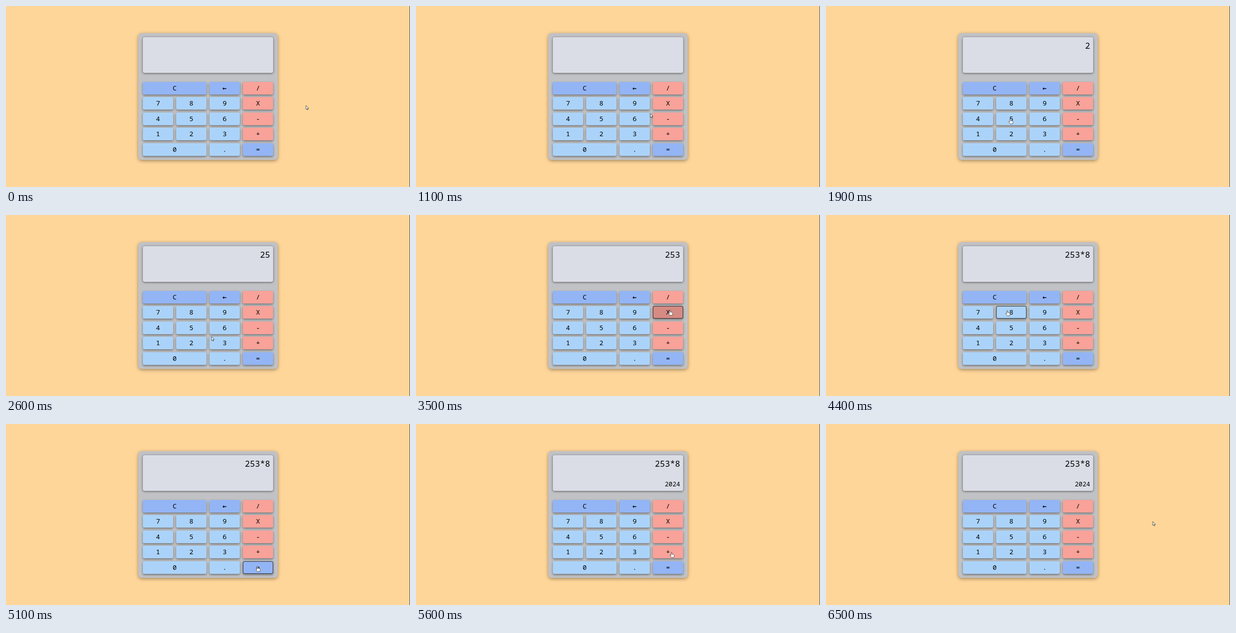
An HTML page for the animation above (6.6 s loop, 800 px wide and 360 px high).

```html
<!DOCTYPE html>
<html lang="en">
<head>
<meta charset="utf-8">
<title>Calculator</title>
<style>
  html, body { margin: 0; width: 100%; height: 100%; overflow: hidden; }
  body { position: relative; background: #ffd699; font-family: "Noto Sans Mono", "DejaVu Sans Mono", monospace; color: #000; }
  .edge { position: absolute; left: 799px; top: 0; width: 1px; height: 360px; background: #4a524d; }
  .case { position: absolute; left: 262px; top: 54px; width: 276px; height: 252px; border-radius: 7px; background: #c1c2c5; box-shadow: 0 2px 7px rgba(0, 0, 0, .38); }
  .screen { position: absolute; left: 271px; top: 62px; width: 258px; height: 71px; border-radius: 4px; background: #dadde6; box-shadow: 0 1px 4px rgba(0, 0, 0, .55); }
  .line { position: absolute; right: 6px; line-height: 20px; white-space: pre; }
  #entry { top: 6.5px; font-size: 16.7px; }
  #result { top: 47.5px; font-size: 12.6px; }
  .key { --shadow: 0 2px 4px rgba(0, 0, 0, .42); position: absolute; height: 25px; border-radius: 3px; font-size: 13.3px; line-height: 25px; text-align: center; background: #abd3f9; box-shadow: var(--shadow); }
  .blue { background: #93b5f5; }
  .red { background: #f8a299; }
  .back { font-family: "DejaVu Sans Mono", monospace; font-weight: bold; }
  .ring { box-shadow: inset 0 0 0 1px rgba(16, 16, 16, .75), var(--shadow); }
  .down { filter: brightness(.86); }
  #cursor { position: absolute; left: 0; top: 0; width: 14px; height: 16px; overflow: visible; }
  #cursor path { fill: #fff; stroke: #333; stroke-width: .8; stroke-linejoin: round; }
</style>
</head>
<body>
<div class="edge"></div>
<div class="case"></div>
<div class="screen">
  <div class="line" id="entry"></div>
  <div class="line" id="result"></div>
</div>
<div id="keys"></div>
<svg id="cursor">
  <path id="arrow" d="M0 0V7.6L1.8 6 3 8.8 4.3 8.2 3.1 5.6H5.4Z"/>
  <path id="hand" transform="scale(.92)" d="M-1 .8Q0-.5 1 .8V4.2L4.8 5Q6 5.4 5.8 7L5 11.5H-.2L-3.3 7.3Q-3.4 5.6-1.9 6.3L-1 7Z"/>
</svg>
<script>
const LOOP = 6600, STEP = 100;
const SUM = "253*8";
const HOME = { x: 594, y: 198 };
const $ = id => document.getElementById(id);

// one character per column; "_" continues the key on its left
const keys = ["C_←/", "789X", "456-", "123+", "0_.="].flatMap((row, r) =>
  [...row].map((label, c) => {
    if (label === "_") return null;
    const x = 271 + 66 * c, y = 150.5 + 30.5 * r;
    const w = row[c + 1] === "_" ? 126 : 60;
    const el = document.createElement("div");
    el.className = "key";
    el.classList.toggle("blue", "C←=".includes(label));
    el.classList.toggle("red", "/X-+".includes(label));
    el.classList.toggle("back", label === "←");
    el.textContent = label;
    el.style.cssText = `left:${x}px;top:${y}px;width:${w}px`;
    $("keys").append(el);
    return { el, x, y, w };
  })
).filter(Boolean);

// the pointer sets off at "leave" and presses on arrival
const visits = [
  { leave: 700, press: 1430, x: 367, y: 247, lift: 12 },
  { leave: 1650, press: 2000, x: 364, y: 218 },
  { leave: 2400, press: 2700, x: 422, y: 250 },
  { leave: 3000, press: 3400, x: 503, y: 189 },
  { leave: 3700, press: 4100, x: 359, y: 190 },
  { leave: 4500, press: 5100, x: 498, y: 283 },
  { leave: 5500, press: 6200, x: 647, y: 194, lift: 110 }
];

const ease = u => u * u * (3 - 2 * u);

function pointAt(t) {
  const i = visits.findLastIndex(v => t >= v.leave);
  if (i < 0) return HOME;
  const from = visits[i - 1] || HOME, to = visits[i];
  const k = ease(Math.min(1, (t - to.leave) / (to.press - to.leave)));
  return {
    x: from.x + (to.x - from.x) * k,
    y: from.y + (to.y - from.y) * k - (to.lift || 0) * 4 * k * (1 - k)
  };
}

const keyAt = p => keys.find(k => p.x > k.x && p.x < k.x + k.w && p.y > k.y && p.y < k.y + 25);

function render(t) {
  const point = pointAt(t);
  const over = keyAt(point);
  const last = visits.findLast(v => t >= v.press);
  const pressed = last && keyAt(last);
  const typed = visits.filter(v => t >= v.press + 200).length;

  for (const key of keys) {
    const ring = key === pressed && key === over;
    key.el.classList.toggle("ring", ring);
    key.el.classList.toggle("down", ring && t >= last.press + 100 && t < last.press + 200);
  }
  $("entry").textContent = SUM.slice(0, typed);
  $("result").textContent = typed > SUM.length ? SUM.split("*").reduce((a, b) => a * b) : "";
  $("cursor").style.transform = `translate(${Math.round(point.x)}px,${Math.round(point.y)}px)`;
  $("arrow").style.display = over ? "none" : "";
  $("hand").style.display = over ? "" : "none";
}

function tick() {
  render(Math.floor(performance.now() % LOOP / STEP) * STEP);
  requestAnimationFrame(tick);
}
tick();
</script>
</body>
</html>
```
